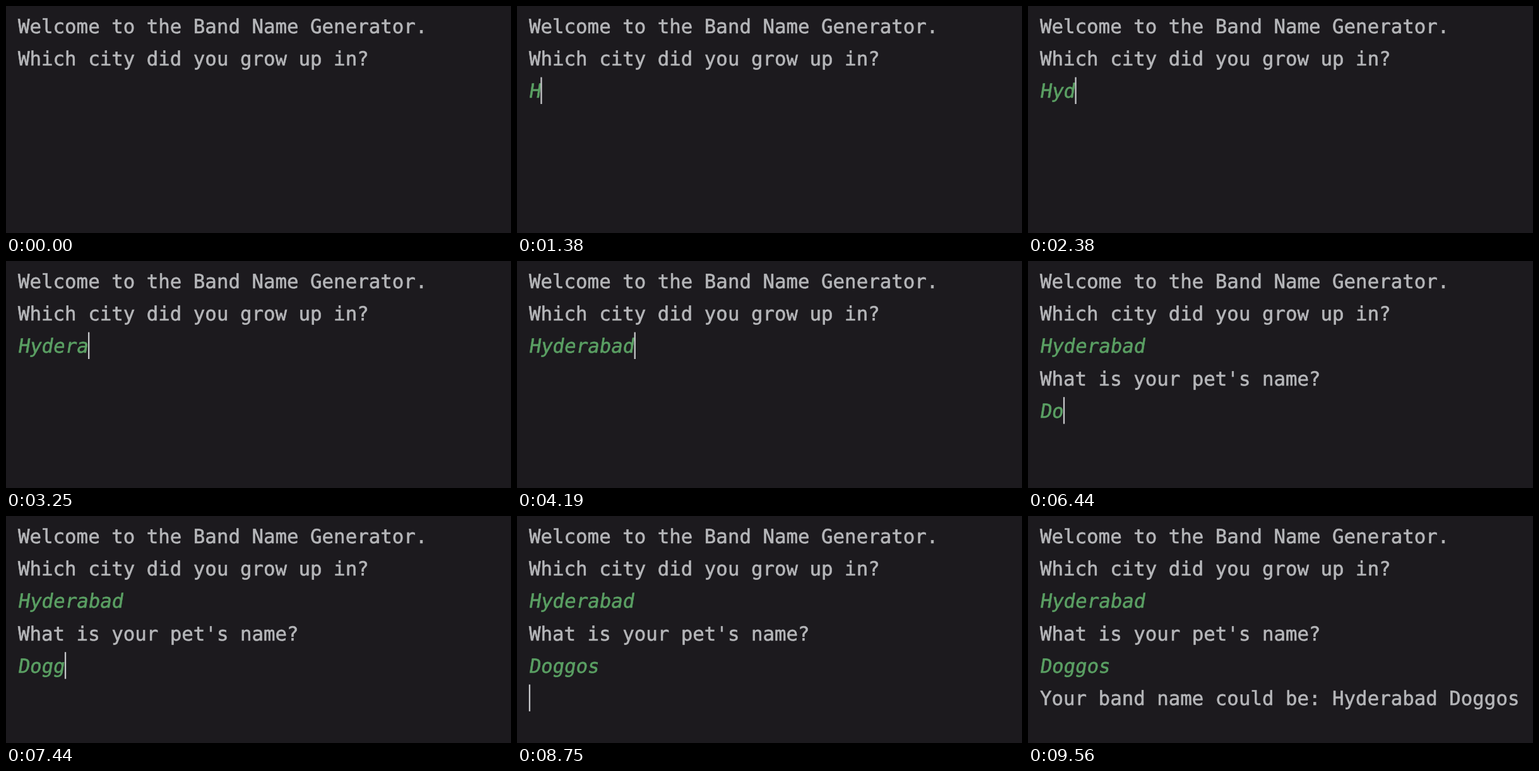
An HTML page for the animation above (10 s loop, 800 by 359 pixels).

```html
<!DOCTYPE html>
<html lang="en">
<head>
<meta charset="utf-8">
<title>Band Name Generator</title>
<style>
  html, body { margin: 0; width: 100%; height: 100%; overflow: hidden; background: #1c1a1e; }
  svg { display: block; width: 800px; height: 359px; }
  text {
    font: 30.78px "DejaVu Sans Mono", "Noto Sans Mono", monospace;
    fill: currentColor;
    stroke: currentColor;
    stroke-width: 0.6px;
    color: #b5b6b9;
    white-space: pre;
    text-rendering: geometricPrecision;
  }
  .input { color: #5a9f63; }
  rect { fill: #c6c7ca; }
</style>
</head>
<body>
<svg viewBox="0 0 800 359"></svg>
<script>
const LOOP = 10000, LEFT = 19, CELL = 18.53, PITCH = 51.3;
const svg = document.querySelector('svg');

const lines = [
  { text: 'Welcome to the Band Name Generator.', at: 0 },
  { text: 'Which city did you grow up in?', at: 0 },
  { text: 'Hyderabad', keys: [1310, 1690, 2060, 2630, 2880, 3130, 3560, 3810, 4130] },
  { text: "What is your pet's name?", at: 4690 },
  { text: 'Doggos', keys: [6060, 6440, 6810, 7190, 7560, 8000] },
  { text: 'Your band name could be: Hyderabad Doggos', at: 8810 }
];

// Caret row from each time on; -1 hides it.
const caretSteps = [
  [0, -1], [250, 2], [4630, 3], [4690, 4],
  [5560, -1], [6000, 4], [8630, 5], [8810, -1]
];

function add(tag, attrs) {
  const el = document.createElementNS('http://www.w3.org/2000/svg', tag);
  for (const name in attrs) el.setAttribute(name, attrs[name]);
  return svg.appendChild(el);
}

lines.forEach((line, row) => {
  const y = 42.8 + row * PITCH;
  line.el = add('text', line.keys
    ? { class: 'input', transform: `translate(${LEFT - 0.8} ${y}) skewX(-9)` }
    : { x: LEFT, y });
});
const caret = add('rect', { width: 2.3, height: 42.4 });

function shownCount(line, t) {
  if (line.keys) return line.keys.filter(k => k <= t).length;
  return t >= line.at ? line.text.length : 0;
}

function draw(t) {
  for (const line of lines) {
    const shown = line.text.slice(0, shownCount(line, t));
    if (line.el.textContent !== shown) line.el.textContent = shown;
  }
  const row = caretSteps.filter(([at]) => at <= t).pop()[1];
  caret.style.display = row < 0 ? 'none' : '';
  if (row < 0) return;
  caret.setAttribute('x', LEFT - 0.2 + CELL * shownCount(lines[row], t));
  caret.setAttribute('y', 10 + row * PITCH);
}

const start = performance.now();
function tick() {
  draw((performance.now() - start) % LOOP);
  requestAnimationFrame(tick);
}
tick();
</script>
</body>
</html>
```
